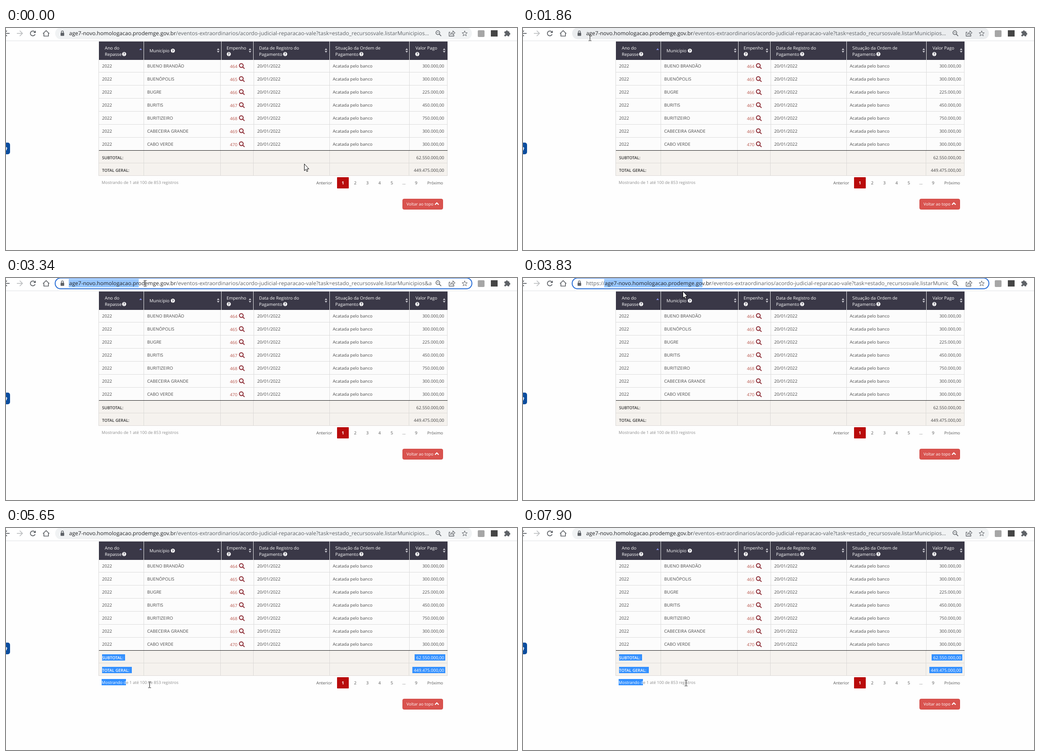
Recreate the animation shown at these times as an HTML page with a canvas. Size 1133 by 494 pixels, loop 8000 ms.

```html
<!DOCTYPE html>
<html lang="pt-BR">
<head>
<meta charset="utf-8">
<title>Repasses por município</title>
<style>
html, body { margin: 0; width: 100%; height: 100%; overflow: hidden; background: #fefefe; }
canvas { display: block; width: 1133px; height: 494px; }
</style>
</head>
<body>
<canvas id="stage"></canvas>
<script>
const W = 1133, H = 494, LOOP = 8000, STEP = 120;
const canvas = document.getElementById('stage');
const ctx = canvas.getContext('2d');
const ratio = window.devicePixelRatio || 1;
canvas.width = W * ratio;
canvas.height = H * ratio;

const FAMILY = '"Open Sans", "Noto Sans", sans-serif';
const HOST = 'age7-novo.homologacao.prodemge.gov.br';
const PATH = '/eventos-extraordinarios/acordo-judicial-reparacao-vale?task=estado_recursosvale.listarMunicipios';
const URL_SIZE = 12.02;
const RECORDS = 'Mostrando de 1 até 100 de 853 registros';
const ANCHOR = 266;

const rows = [
  ['BUENO BRANDÃO', '300.000,00'],
  ['BUENÓPOLIS', '300.000,00'],
  ['BUGRE', '225.000,00'],
  ['BURITIS', '450.000,00'],
  ['BURITIZEIRO', '750.000,00'],
  ['CABECEIRA GRANDE', '300.000,00'],
  ['CABO VERDE', '300.000,00']
];

// Pointer moves: start time, number of steps, end x, end y
const moves = [
  [900, 7, 139, 34], [1740, 1, 142, 18], [1860, 1, 148, 22], [1980, 1, 145, 16],
  [2120, 2, 143, 13], [2490, 1, 142, 13], [2740, 6, 308, 12], [3460, 1, 345, 12],
  [3580, 1, 358, 12], [3830, 7, 279, 343], [4670, 1, 276, 343], [4790, 4, 266, 344],
  [5410, 2, 300, 346], [5650, 2, 335, 352], [5890, 2, 372, 344], [6260, 1, 376, 352],
  [6380, 1, 373, 344], [6770, 3, 386, 352], [7530, 1, 368, 346], [7650, 1, 346, 342],
  [7900, 1, 361, 345]
];

function pointerAt(t) {
  let x = 661, y = 303;
  for (const [start, steps, toX, toY] of moves) {
    if (t < start) break;
    const done = Math.min(steps, Math.floor((t - start) / STEP) + 1) / steps;
    const k = done * done * (3 - 2 * done);
    x += (toX - x) * k;
    y += (toY - y) * k;
  }
  return { x: Math.round(x), y: Math.round(y) };
}

function setFont(size, weight = 400) {
  ctx.font = `${weight} ${size}px ${FAMILY}`;
}

function text(str, x, y, color, size = 9.7, align = 'left', weight = 400) {
  setFont(size, weight);
  ctx.fillStyle = color;
  ctx.textAlign = align;
  ctx.fillText(str, x, y);
}

function rect(x, y, w, h, color) {
  ctx.fillStyle = color;
  ctx.fillRect(x, y, w, h);
}

function round(x, y, w, h, r, fill, stroke, width = 1) {
  ctx.beginPath();
  ctx.roundRect(x, y, w, h, r);
  if (fill) { ctx.fillStyle = fill; ctx.fill(); }
  if (stroke) { ctx.strokeStyle = stroke; ctx.lineWidth = width; ctx.stroke(); }
}

function line(points, color, width = 1) {
  ctx.beginPath();
  for (let i = 0; i < points.length; i += 2) ctx.lineTo(points[i], points[i + 1]);
  ctx.strokeStyle = color;
  ctx.lineWidth = width;
  ctx.stroke();
}

function poly(points, fill, stroke) {
  ctx.beginPath();
  for (let i = 0; i < points.length; i += 2) ctx.lineTo(points[i], points[i + 1]);
  ctx.closePath();
  if (fill) { ctx.fillStyle = fill; ctx.fill(); }
  if (stroke) { ctx.strokeStyle = stroke; ctx.lineWidth = 1; ctx.stroke(); }
}

function disc(x, y, r, color) {
  ctx.beginPath();
  ctx.arc(x, y, r, 0, Math.PI * 2);
  ctx.fillStyle = color;
  ctx.fill();
}

function arc(x, y, r, from, to, color, width) {
  ctx.beginPath();
  ctx.arc(x, y, r, from, to);
  ctx.strokeStyle = color;
  ctx.lineWidth = width;
  ctx.stroke();
}

function lens(x, y, r, tail, color, width) {
  arc(x, y, r, 0, Math.PI * 2, color, width);
  const d = r * 0.75;
  line([x + d, y + d, x + d + tail, y + d + tail], color, width);
}

// Highlight box; the text inside it is redrawn in white
function highlight(x, y, w, h, paint) {
  ctx.save();
  rect(x, y, w, h, '#3390ff');
  ctx.beginPath();
  ctx.rect(x, y, w, h);
  ctx.clip();
  paint('#fff');
  ctx.restore();
}

function drawNavIcons() {
  const ink = '#5f6368';
  line([-4, 12, 8, 12], ink, 1.8);
  line([2, 6, -4, 12, 2, 18], ink, 1.8);
  line([24, 12, 36, 12], '#babcbe', 1.6);
  line([30.5, 6, 36.5, 12, 30.5, 18], '#babcbe', 1.6);
  arc(59.5, 12, 5.4, 0.35, Math.PI * 1.75, ink, 1.8);
  poly([66, 5.5, 66, 11, 60.5, 11], ink);
  line([82, 12.5, 89, 6, 96, 12.5], ink, 1.7);
  line([84, 11.5, 84, 18, 94, 18, 94, 11.5], ink, 1.7);
}

function drawFieldIcons() {
  const ink = '#5f6368';
  round(121, 10.5, 8, 7, 1, ink);
  line([122.7, 11, 122.7, 8.5], ink, 1.4);
  line([127.3, 11, 127.3, 8.5], ink, 1.4);
  arc(125, 8.7, 2.3, Math.PI, 0, ink, 1.4);

  lens(957.5, 10.5, 4.2, 4.2, ink, 1.5);
  line([955.5, 10.5, 959.5, 10.5], ink, 1);

  line([985, 9.5, 982.5, 9.5, 982.5, 18, 993, 18, 993, 15], ink, 1.3);
  ctx.beginPath();
  ctx.moveTo(985.5, 15);
  ctx.quadraticCurveTo(986, 9.5, 991, 9.5);
  ctx.lineTo(991, 6.5);
  ctx.lineTo(995.5, 10.8);
  ctx.lineTo(991, 15);
  ctx.lineTo(991, 12);
  ctx.quadraticCurveTo(988, 12, 985.5, 15);
  ctx.lineWidth = 1.1;
  ctx.stroke();

  const star = [];
  for (let i = 0; i < 10; i++) {
    const r = i % 2 ? 2.6 : 6.2, a = i * Math.PI / 5 - Math.PI / 2;
    star.push(1017 + r * Math.cos(a), 12.5 + r * Math.sin(a));
  }
  poly(star, null, ink);
}

function drawExtensions() {
  round(1046, 5, 15, 15, 2, '#a6a6a6');
  rect(1075, 5, 15, 14, '#454545');
  const ink = '#5f6368';
  round(1105, 7.5, 11, 11, 1.2, ink);
  disc(1110.5, 7.5, 2.2, ink);
  disc(1116, 13, 2.2, ink);
  disc(1105.3, 13.3, 1.8, '#fff');
  disc(1110.3, 18.3, 1.8, '#fff');
}

function urlSelection(t, x) {
  setFont(URL_SIZE);
  if (t >= 3580) return ctx.measureText(HOST.slice(0, HOST.indexOf('v.br'))).width;
  let n = 0;
  while (n < HOST.length && 140 + ctx.measureText(HOST.slice(0, n + 1)).width < x - 9) n++;
  return ctx.measureText(HOST.slice(0, n)).width;
}

function drawAddress(t, pointer) {
  const focused = t >= 2740 && t < 5150;
  const hovered = t >= 1740 && t < 2740;
  if (focused) round(109, 0, 924, 24, 12, '#fff', '#2a6fd6', 2);
  else round(109, -1, 924, 26, 13, hovered ? '#ebedef' : '#f1f3f4');

  const scheme = t >= 3830 && focused ? 'https://' : '';
  ctx.save();
  ctx.beginPath();
  ctx.rect(136, 0, focused ? 807 : 812, 25);
  ctx.clip();
  setFont(URL_SIZE);
  const hostX = 140 + ctx.measureText(scheme).width;
  const pathX = hostX + ctx.measureText(HOST).width;
  if (focused) {
    const w = urlSelection(t, pointer.x);
    if (w > 0) rect(hostX - 1, 2, w + 2, 19, '#99c8ff');
  }
  text(scheme, 140, 16, '#5f6368', URL_SIZE);
  text(HOST, hostX, 16, '#202124', URL_SIZE);
  text(PATH + (focused ? '&ano' : '...'), pathX, 16, '#5f6368', URL_SIZE);
  ctx.restore();
  drawFieldIcons();
}

function drawHelp(x, y) {
  disc(x, y, 4.5, '#fff');
  text('?', x, y + 3, '#3a3847', 8, 'center', 700);
}

function drawSort(x) {
  poly([x - 2.8, 49, x, 45, x + 2.8, 49], '#c9c8cf');
  poly([x - 2.8, 51, x, 55, x + 2.8, 51], '#c9c8cf');
}

function drawHeader() {
  rect(206, 30, 773, 41, '#3a3847');
  for (const x of [305, 477, 548, 717, 894]) rect(x, 30, 1, 41, '#e4e4e6');
  const label = (str, x, y) => text(str, x, y + 4, '#fff', 9.7, 'left', 500);
  const stacked = (a, b, x) => { label(a, x, 44); label(b, x, 58); };
  stacked('Ano do', 'Repasse', 219);
  label('Município', 318, 50);
  label('Empenho', 489, 44);
  stacked('Data de Registro do', 'Pagamento', 561);
  stacked('Situação da Ordem de', 'Pagamento', 730);
  label('Valor Pago', 908, 44);
  drawHelp(370, 50.5);
  for (const x of [262, 494, 619, 788, 912]) drawHelp(x, 58);
  poly([295.5, 49, 298.5, 45, 301.5, 49], '#8088dc');
  [470.5, 541, 709.5, 888.5, 971.5].forEach(drawSort);
}

function drawRows() {
  const ink = '#4c4c4c';
  rect(206, 71, 773, 201, '#fcfcfc');
  rows.forEach(([city, value], i) => {
    const y = 84 + i * 29, base = y + 4;
    if (i) rect(206, y - 15, 773, 1, '#dcdcdc');
    text('2022', 213, base, ink);
    text(city, 313, base, ink);
    text(String(464 + i), 496.5, base + 1, '#b9594f');
    lens(521.7, y - 0.5, 4.2, 4, '#8b2932', 2);
    text('20/01/2022', 557, base, ink);
    text('Acatada pelo banco', 724.5, base, ink, 9.65);
    text(value, 971.5, base, ink, 9.5, 'right');
  });
}

function drawTotals(selected) {
  rect(206, 273, 773, 56, '#f5f2ee');
  for (const x of [205, 305, 475, 549, 717, 894, 978]) rect(x, 71, 1, 202, '#dcdcdc');
  for (const x of [205, 305, 475, 548, 717, 893, 978]) rect(x, 273, 1, 56, '#dcdad7');
  rect(206, 272, 773, 1, '#1c1c1c');
  rect(206, 300, 773, 1, '#dcdad7');
  rect(206, 328, 773, 1, '#dcdad7');

  const totals = [
    ['SUBTOTAL:', '62.550.000,00', 288, 51, 906],
    ['TOTAL GERAL:', '449.475.000,00', 316, 66, 901]
  ];
  for (const [name, value, y, w, left] of totals) {
    const paintName = c => text(name, 213, y + 4, c, 9.1, 'left', 600);
    const paintValue = c => text(value, 971.5, y + 4, c, 9.5, 'right');
    paintName('#333');
    paintValue('#444');
    if (selected) {
      highlight(213, y - 7, w, 14, paintName);
      highlight(left, y - 7, 974 - left, 14, paintValue);
    }
  }
}

function drawFooter(forward, backward, pointer) {
  const paint = c => text(RECORDS, 212, 347, c, 9.07);
  paint('#8c8c8c');
  if (forward && pointer.x > ANCHOR) highlight(ANCHOR, 336, pointer.x - 1 - ANCHOR, 14, paint);
  if (backward) highlight(212, 336, ANCHOR - 212, 14, paint);

  const ink = '#555';
  text('Anterior', 688, 348, ink, 9.1);
  round(734, 332, 26, 25, 1, '#b90b0b');
  text('1', 747, 348, '#fff', 9.4, 'center', 700);
  ['2', '3', '4', '5', '…', '9'].forEach((page, i) => {
    text(page, 774.5 + i * 27, 348, ink, 9.3, 'center');
  });
  text('Próximo', 934, 348, ink, 9);

  round(879.5, 380.5, 89, 23, 3, '#d9534f', '#d04540');
  text('Voltar ao topo', 888, 395, '#fff', 9.06);
  line([951.2, 393.2, 955.2, 389.2, 959.2, 393.2], '#fff', 2.3);
}

function drawSideTab() {
  round(-10, 255, 19, 26, 5, '#0b4d9e');
  poly([-3, 268, 0, 264.5, 3.5, 268], '#fff');
  rect(0, 268, 1.5, 4, '#fff');
}

function drawArrow({ x, y }) {
  poly([x + .5, y - .5, x + .5, y + 14.5, x + 3.8, y + 11.5, x + 6, y + 16.5,
    x + 8.3, y + 15.5, x + 6.2, y + 10.7, x + 10.7, y + 10.7], '#fff', '#000');
}

function drawBeam({ x, y }) {
  const stroke = (color, width) => {
    line([x + .5, y - 6, x + .5, y + 6], color, width);
    for (const dy of [-6.5, 6.5]) {
      line([x - 2.5, y + dy, x, y + dy], color, width);
      line([x + 1, y + dy, x + 3.5, y + dy], color, width);
    }
  };
  stroke('rgba(255,255,255,.7)', 2.4);
  stroke('#111', 1);
}

function draw(t) {
  const pointer = pointerAt(t);
  const backward = (t >= 5650 && t < 5890) || (t >= 6260 && t < 6380) || t >= 6770;
  const forward = t >= 5410 && !backward;

  ctx.setTransform(ratio, 0, 0, ratio, 0, 0);
  ctx.textBaseline = 'alphabetic';
  ctx.textRendering = 'geometricPrecision';
  rect(0, 0, W, H, '#fefefe');
  rect(0, 0, W, 28, '#fff');
  rect(0, 28, W, 1, '#dfe1e4');
  drawNavIcons();
  drawAddress(t, pointer);
  drawExtensions();
  drawHeader();
  drawRows();
  drawTotals(backward);
  drawFooter(forward, backward, pointer);
  drawSideTab();
  if (pointer.y < 26 || t >= 4550) drawBeam(pointer);
  else drawArrow(pointer);
}

function tick() {
  draw(performance.now() % LOOP);
  requestAnimationFrame(tick);
}
tick();
</script>
</body>
</html>
```
